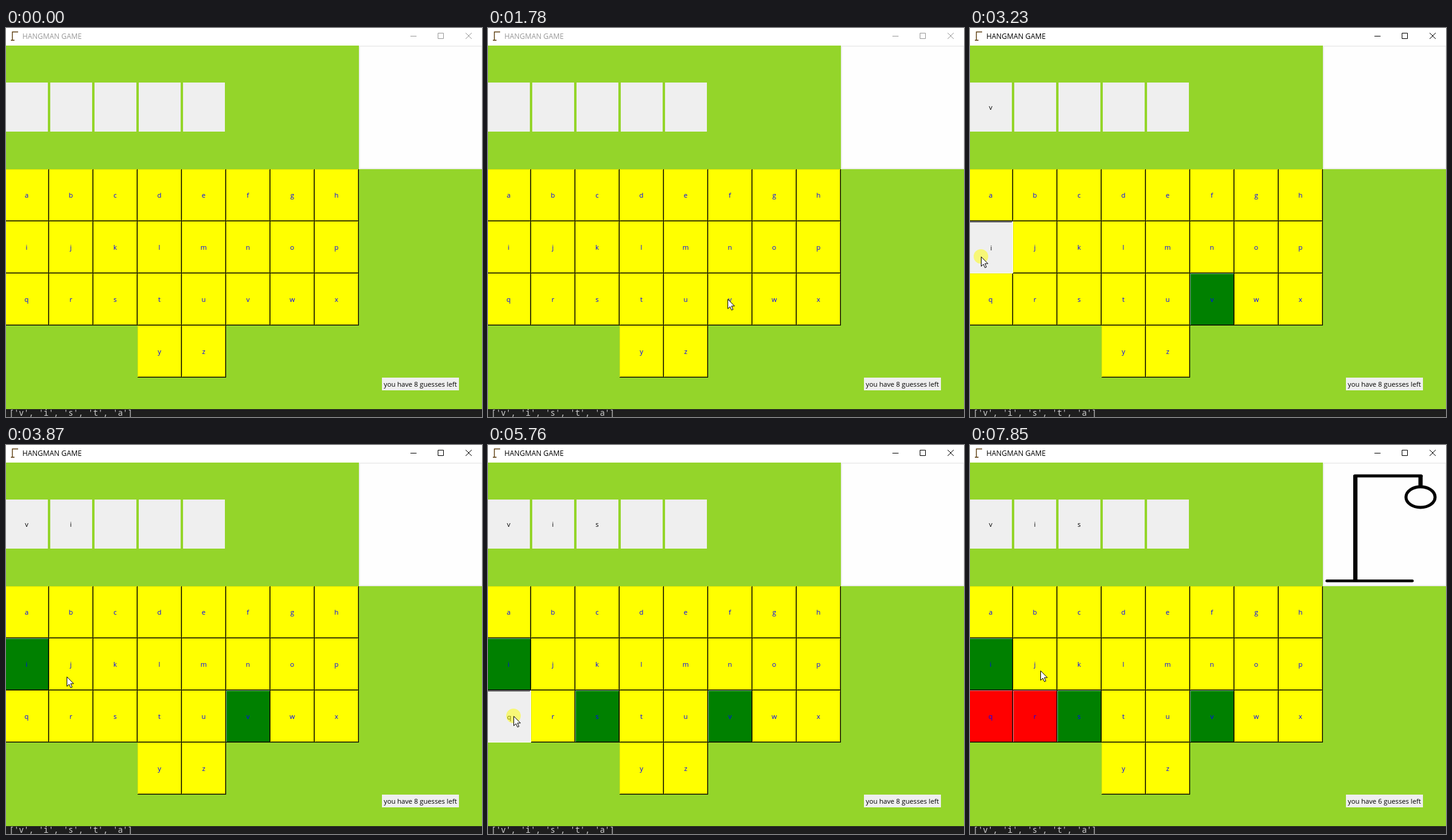
An HTML page for the animation above (8000 ms loop, 785x642 px).

```html
<!DOCTYPE html>
<html lang="en">
<head>
<meta charset="utf-8">
<title>Hangman</title>
<style>
  html, body { margin: 0; width: 100%; height: 100%; overflow: hidden; background: #fff; }
  svg { display: block; width: 785px; height: 642px; }
  text { font: 11.2px "Open Sans", "Noto Sans", sans-serif; }
  .mid { text-anchor: middle; }
  .title { font-size: 11.9px; }
  .mono { font: 13.6px "Noto Sans Mono", "DejaVu Sans Mono", monospace; white-space: pre; }
  .sharp { shape-rendering: crispEdges; }
</style>
</head>
<body>
<svg id="stage" viewBox="0 0 785 642" xmlns="http://www.w3.org/2000/svg"></svg>
<script>
const LOOP = 8000;
const STEP = 50;
const WORD = 'vista';

const GREY = [239, 239, 239];
const YELLOW = [255, 255, 0];
const GREEN = [0, 128, 0];
const RED = [255, 0, 0];
const rgb = c => `rgb(${c.map(Math.round)})`;

const CLICKS = [
  { letter: 'v', down: 2010, up: 2110 },
  { letter: 'i', down: 3180, up: 3280 },
  { letter: 's', down: 4550, up: 4660 },
  { letter: 'q', down: 5760, up: 5940 },
  { letter: 'r', down: 6910, up: 7110 },
];

// Each move goes from the last resting place to x, y; bow bends it vertically.
const ENTRY = { x: 640, y: 622 };
const MOVES = [
  { start: 300, end: 930, x: 273, y: 429, bow: 14 },
  { start: 1140, end: 1780, x: 395, y: 447, bow: -17 },
  { start: 2340, end: 3130, x: 18, y: 377, bow: -18 },
  { start: 3350, end: 3870, x: 100, y: 382, bow: 0 },
  { start: 3900, end: 4450, x: 188, y: 462, bow: 0 },
  { start: 4890, end: 5350, x: 42, y: 447, bow: -8 },
  { start: 6270, end: 6680, x: 82, y: 444, bow: -3 },
  { start: 7420, end: 7850, x: 116, y: 372, bow: 0 },
];

const stage = document.getElementById('stage');

function add(tag, attrs, parent = stage) {
  const el = document.createElementNS('http://www.w3.org/2000/svg', tag);
  for (const k in attrs) el.setAttribute(k, attrs[k]);
  parent.appendChild(el);
  return el;
}
const rect = (x, y, width, height, fill) =>
  add('rect', { x, y, width, height, fill, class: 'sharp' });
const line = (d, stroke, width, parent) =>
  add('path', { d, stroke, 'stroke-width': width, fill: 'none' }, parent);
function label(x, y, str, fill, cls = '') {
  const el = add('text', { x, y, fill, class: cls });
  el.textContent = str;
  return el;
}
const show = (el, on) => el.setAttribute('visibility', on ? 'visible' : 'hidden');

// Terminal strip, then the window on top of it
rect(0, 0, 785, 642, '#1e1e1e');
label(5, 640, '[' + [...WORD].map(c => `'${c}'`).join(', ') + ']', '#d0d0d0', 'mono');
rect(0, 29, 785, 600, '#94d52a');
rect(0, 0, 785, 29, '#fff');
line('M10.5 20V6.5H20M8 20.3H14', '#5e3f12', 1.4);
const title = label(27, 18, 'HANGMAN GAME', '#999', 'title');
const controls = line('M667 13.5H677M712.5 8.5H721.5V17.5H712.5ZM758 8L768 18M768 8L758 18', '#999', 1);

// Picture panel
rect(582, 29, 203, 204, rgb(GREY));
rect(584, 31, 200, 200, '#fefefe');

function gallows(frame, pole, base) {
  const g = add('g', { 'stroke-linecap': 'round' });
  line(base, '#000', 4.6, g);
  line(pole, '#000', 7, g).setAttribute('stroke-linecap', 'butt');
  line(frame, '#000', 5, g);
  return g;
}
const empty = gallows('M644.5 56.3H767', 'M646 55V221M765.2 55V73', 'M593.5 221H750');
const head = gallows('M634.5 51H744', 'M635.5 50V224M743 50V69', 'M588.5 224.2H729.5');
add('ellipse', { cx: 743, cy: 86, rx: 24, ry: 17, fill: 'none', stroke: '#000', 'stroke-width': 5 }, head);

// Answer slots
const slots = [...WORD].map((c, i) => {
  rect(73 * i, 90, 69, 81, rgb(GREY));
  return label(73 * i + 34, 135, c, '#000', 'mid');
});

// Keyboard
const keys = {};
[...'abcdefghijklmnopqrstuvwxyz'].forEach((c, i) => {
  const row = i >> 3;
  const col = (i & 7) + (row === 3 ? 3 : 0);
  const x = 73 * col - 2;
  const y = 233 + 86 * row;
  const face = rect(x, y, 73, 86);
  const edges = add('g', { class: 'sharp' });
  const corner = inset => line(
    `M${x + inset + .5} ${y + 85 - inset}V${y + inset + .5}H${x + 72 - inset}`, '', 1, edges);
  const foot = inset => line(
    `M${x + 72.5 - inset} ${y + inset}V${y + 85.5 - inset}H${x + inset}`, '', 1, edges);
  keys[c] = {
    face,
    bevel: [corner(0), corner(1), foot(1), foot(0)],
    text: label(x + 36, y + 47, c, '', 'mid'),
  };
});

// Bright faces get a darker highlight, all others one halfway to white.
const highlight = c => c[1] > 242 ? c.map(v => v * .9) : c.map(v => (v + 255) / 2);
const shadow = c => c.map(v => v * .6);

function paintKey({ face, bevel, text }, color, held) {
  const fill = rgb(color);
  const light = rgb(highlight(color));
  const dark = rgb(shadow(color));
  const strokes = held ? [dark, '#696969', fill, '#fff'] : [light, fill, dark, '#000'];
  face.setAttribute('fill', fill);
  bevel.forEach((el, i) => el.setAttribute('stroke', strokes[i]));
  text.setAttribute('fill', held ? '#000' : '#00f');
  text.setAttribute('transform', held ? 'translate(1 1)' : '');
}
for (const c in keys) paintKey(keys[c], YELLOW, false);

// Guess counter
rect(620, 577, 127, 21, rgb(GREY));
const counter = label(623, 592, '', '#000');

// Pointer
const pointer = add('g', {});
const halo = add('circle', { r: 12, fill: '#ff0', 'fill-opacity': .5 }, pointer);
add('path', {
  d: 'M.5 .7V16.3L4.1 12.9L6.7 18.6L9.1 17.5L6.6 11.9H11.5Z',
  fill: '#fff', stroke: '#000', 'stroke-width': 1,
}, pointer);

const ease = u => 1 - (1 - u) ** 1.13;

function pointerAt(t) {
  let { x, y } = ENTRY;
  for (const m of MOVES) {
    if (t < m.start) break;
    const steps = Math.round((m.end - m.start) / STEP);
    const u = Math.min(1, (t - m.start) / (m.end - m.start));
    const e = ease(Math.round(u * steps) / steps);
    x += (m.x - x) * e;
    y += (m.y - y) * e + 4 * m.bow * e * (1 - e);
  }
  return [Math.round(x), Math.round(y)];
}

function render(t) {
  const active = t >= CLICKS[0].down;
  title.setAttribute('fill', active ? '#000' : '#999');
  controls.setAttribute('stroke', active ? '#000' : '#999');

  let misses = 0;
  let pressing = false;
  for (const { letter, down, up } of CLICKS) {
    const held = t >= down && t < up;
    const done = t >= up;
    const hit = WORD.includes(letter);
    if (done && !hit) misses++;
    pressing = pressing || held;
    paintKey(keys[letter], held ? GREY : !done ? YELLOW : hit ? GREEN : RED, held);
  }
  slots.forEach((el, i) => {
    show(el, CLICKS.some(k => k.letter === WORD[i] && t >= k.up));
  });
  show(empty, misses === 1);
  show(head, misses === 2);
  counter.textContent = `you have ${8 - misses} guesses left`;

  pointer.setAttribute('transform', `translate(${pointerAt(t)})`);
  show(pointer, t >= MOVES[0].start);
  halo.setAttribute('display', pressing ? 'inline' : 'none');
}

const start = performance.now();
function tick() {
  render((performance.now() - start) % LOOP);
  requestAnimationFrame(tick);
}
tick();
</script>
</body>
</html>
```
